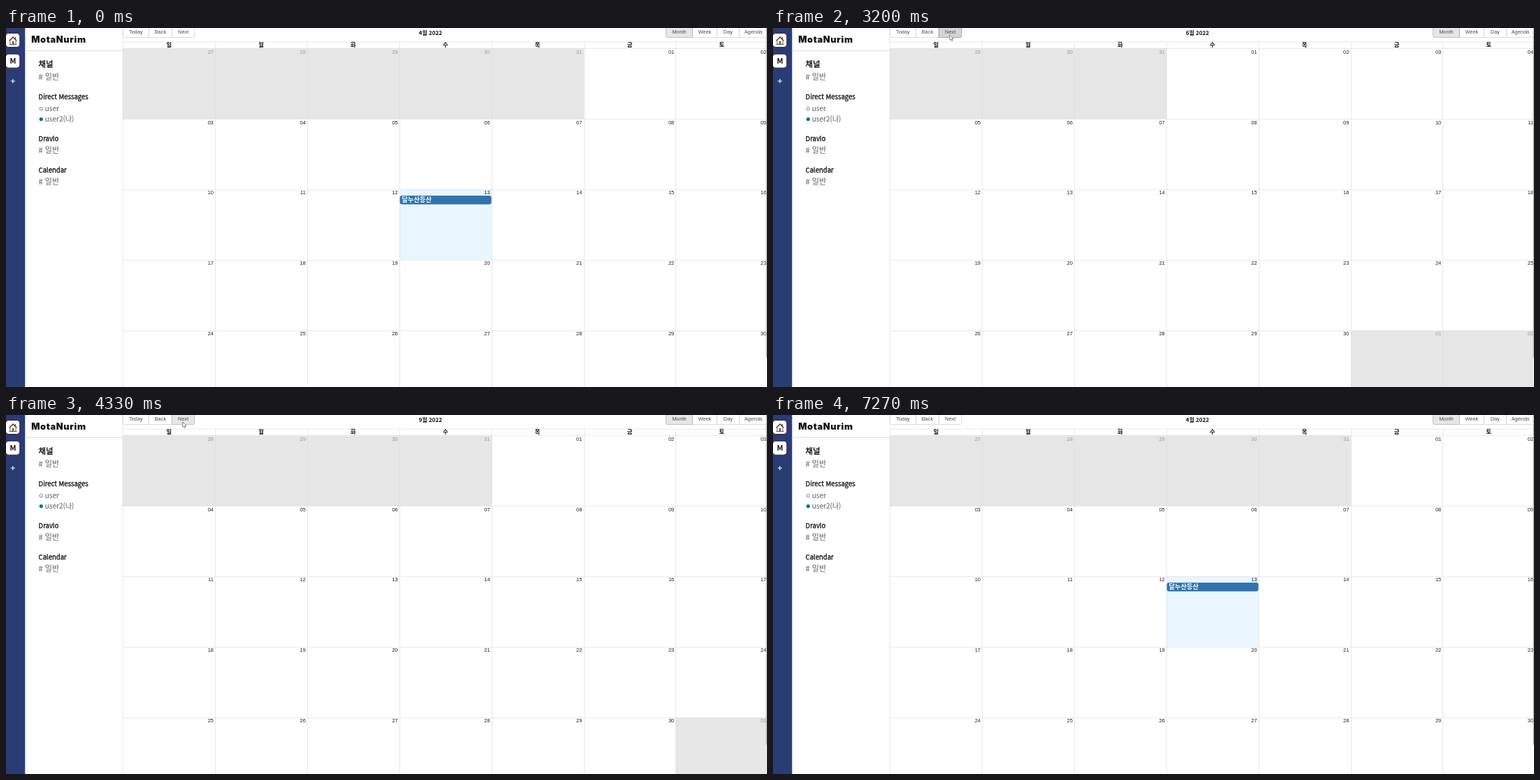
An HTML page for the animation above (8610 ms loop, 1089 by 514 pixels).

```html
<!DOCTYPE html>
<html lang="ko">
<head>
<meta charset="utf-8">
<title>Calendar</title>
<style>
  html, body { margin: 0; width: 100%; height: 100%; overflow: hidden; background: #fff; }
  svg { display: block; width: 100vw; height: 100vh; }
  text { font-family: "Noto Sans CJK KR", "Noto Sans CJK", "Noto Sans CJK JP", sans-serif; white-space: pre; }
  .brand { font: 900 12.8px Inter, sans-serif; letter-spacing: .65px; fill: #111; }
  .head { font-size: 9.5px; fill: #111; stroke: #111; stroke-width: .3px; }
  .head.ko { font-size: 11.4px; stroke-width: .45px; }
  .item { font-size: 10px; fill: #6c6c6c; stroke: #6c6c6c; stroke-width: .12px; }
  .item.ko { font-size: 11px; }
  .week { font-size: 8.3px; font-weight: 700; fill: #111; text-anchor: middle; }
  .label { font-size: 8px; font-weight: 700; fill: #111; text-anchor: middle; }
  .event { font-size: 9.2px; font-weight: 700; fill: #fff; }
  .day { font: 7.5px "Liberation Sans", Arial, sans-serif; fill: #222; text-anchor: end; }
  .day.off { fill: #999; }
  .line { fill: #ddd; opacity: .65; }
  .btn text { font: 7.4px "Liberation Sans", Arial, sans-serif; fill: #4c4f51; text-anchor: middle; }
  .btn path { fill: #fff; stroke: #ccc; stroke-width: .7px; }
  .btn.lit path { fill: #e6e6e6; stroke: #adadad; }
  .btn.down path { fill: #d4d4d4; stroke: #8c8c8c; }
</style>
</head>
<body>
<svg id="stage" viewBox="0 0 1089 514"></svg>
<script>
const LOOP = 8610;
const stage = document.getElementById('stage');

function add(parent, tag, attrs, text) {
  const node = document.createElementNS('http://www.w3.org/2000/svg', tag);
  for (const key in attrs) node.setAttribute(key, attrs[key]);
  if (text) node.textContent = text;
  parent.append(node);
  return node;
}
const box = (parent, x, y, width, height, fill, more) =>
  add(parent, 'rect', { x, y, width, height, fill, ...more });
const line = (parent, x, y, width, height) =>
  add(parent, 'rect', { class: 'line', x, y, width, height });
const label = (parent, cls, x, y, text) => add(parent, 'text', { class: cls, x, y }, text);
const path = (parent, d, fill, more) => add(parent, 'path', { d, fill, ...more });

// Sidebar
function drawSidebar() {
  box(stage, 0, 0, 27.3, 514, '#293c74');
  for (const y of [7.5, 37.2])
    box(stage, -.6, y, 20.4, 20, '#fff', { rx: 4.5, stroke: '#3f1c40', 'stroke-width': 1 });
  path(stage, 'M6 17.5V23.5H14V17.5L10 13.5Z', '#fff', { stroke: '#4a3a34', 'stroke-width': .8 });
  path(stage, 'M4.5 18.3L10 12.8L15.5 18.3', 'none', { stroke: '#4a2a26', 'stroke-width': 1.2 });
  box(stage, 12.7, 12.8, 1.2, 3, '#4a2a26');
  box(stage, 8.8, 18.8, 2.5, 4.5, '#b5372b');
  box(stage, 4.5, 22.9, 11, 1.2, '#2f8045');
  add(stage, 'text', { x: 10, y: 50.7, 'text-anchor': 'middle', 'font-size': 10.5, 'font-weight': 700, fill: '#111' }, 'M');
  path(stage, 'M6.8 76H12.9M9.85 72.9V79.1', 'none', { stroke: '#fff', 'stroke-width': 1.1 });

  label(stage, 'brand', 36.2, 21.3, 'MotaNurim');
  box(stage, 27.5, 32, 139.5, 1, '#ddd');
  label(stage, 'head ko', 46.6, 56.4, '채널');
  label(stage, 'head', 46.6, 101.6, 'Direct Messages');
  label(stage, 'head', 46.6, 161.6, 'Dravlo');
  label(stage, 'head', 46.6, 206.6, 'Calendar');
  for (const y of [73.9, 178.9, 223.9]) label(stage, 'item ko', 46.6, y, '# 일반');
  add(stage, 'circle', { cx: 50.2, cy: 115.6, r: 2.2, fill: 'none', stroke: '#777', 'stroke-width': .9 });
  add(stage, 'circle', { cx: 50.3, cy: 130.6, r: 2.6, fill: '#007a5a' });
  label(stage, 'item', 55.8, 119, 'user');
  label(stage, 'item', 55.8, 134, 'user2(나)');
}

// Calendar
const TOP = 29.4, BOTTOM = 534;
const colX = i => 167.3 + 131.85 * i;
const pad = n => String(n).padStart(2, '0');

function drawMonth(month) {
  const group = add(stage, 'g', { visibility: 'hidden' });
  const first = new Date(2022, month - 1, 1).getDay();
  const days = new Date(2022, month, 0).getDate();
  const rows = Math.ceil((first + days) / 7);
  const rowY = i => TOP + (BOTTOM - TOP) / rows * i;
  const cells = Array.from({ length: rows * 7 }, (_, i) => ({
    x: Math.round(colX(i % 7)), y: Math.round(rowY(i / 7 | 0)),
    right: Math.round(colX(i % 7 + 1)), bottom: Math.round(rowY((i / 7 | 0) + 1)),
    date: new Date(2022, month - 1, 1 - first + i).getDate(),
    off: i < first || i >= first + days,
    now: month === 4 && i === first + 12
  }));
  for (const c of cells)
    if (c.off || c.now)
      box(group, c.x, c.y, c.right - c.x, c.bottom - c.y, c.now ? '#eaf6ff' : '#e6e6e6');
  for (let i = 0; i < rows; i++) line(group, 167, Math.round(rowY(i)), 922, 1);
  for (let i = 1; i < 7; i++) line(group, Math.round(colX(i)), 20, 1, 494);
  cells.forEach((c, i) => {
    label(group, c.off ? 'day off' : 'day', colX(i % 7 + 1) - 2.1, rowY(i / 7 | 0) + 7.2, pad(c.date));
    if (!c.now) return;
    box(group, c.x + .6, c.y + 9, 131, 12.6, '#3174ad', { rx: 3 });
    label(group, 'event', c.x + 3.6, c.y + 18.4, '달누산등산');
  });
  label(group, 'label', 607.3, 9.5, `${month}월 2022`);
  return group;
}

function drawButton(name, x, right, round = '') {
  const group = add(stage, 'g', { class: 'btn' });
  const l = x + .4, r = right + .4;
  const bl = round === 'l' ? 2.5 : 0, br = round === 'r' ? 2.5 : 0;
  path(group, `M${l} -6H${r}V${13.5 - br}q0 ${br} ${-br} ${br}H${l + bl}q${-bl} 0 ${-bl} ${-bl}Z`);
  add(group, 'text', { x: (l + r) / 2, y: 8.4 }, name);
  return { name, x, right, group, state: '' };
}

function setState(button, state) {
  if (button.state === state) return;
  button.state = state;
  button.group.setAttribute('class', 'btn ' + state);
  if (state) button.group.parentNode.append(button.group, cursor);
}

drawSidebar();
const months = {};
for (let m = 4; m <= 10; m++) months[m] = drawMonth(m);
line(stage, 167, 19.5, 922, 1);
line(stage, 166.6, 0, 1, 514);
[...'일월화수목금토'].forEach((d, i) => label(stage, 'week', colX(i + .5), 27, d));

drawButton('Week', 982, 1017);
drawButton('Day', 1017, 1049);
drawButton('Agenda', 1049, 1089, 'r');
const monthButton = drawButton('Month', 944, 982, 'l');
const nav = [
  drawButton('Today', 167, 204, 'l'),
  drawButton('Back', 204, 237),
  drawButton('Next', 237, 269.5, 'r')
];
box(stage, 1087.6, 0, 1.4, 472, '#b4b4b4');
const cursor = path(stage, 'M0 0V7.4L1.8 5.9L3 8.4L4.2 7.9L3.1 5.4H5.3Z', '#fff',
  { stroke: '#555', 'stroke-width': .7, 'stroke-linejoin': 'round' });
setState(monthButton, 'lit');

// Each row holds from its time until the next one.
const monthSteps = [[0, 4], [2000, 5], [2800, 6], [3400, 7], [3870, 8], [4330, 9], [4870, 10], [5470, 4]];
const presses = [[1800, 2000], [2670, 2800], [3200, 3400], [3670, 3870], [4130, 4330], [4670, 4870], [5330, 5470]];
const focusSteps = [[0, ''], [1800, 'Next'], [5330, 'Today'], [7270, '']];
const cursorSteps = [
  [0],
  [470, 118, 50], [537, 146, 56], [603, 186, 58], [670, 228, 55], [737, 266, 46],
  [803, 289, 33], [870, 287, 21], [937, 274, 13], [1003, 262, 9], [1070, 256, 7],
  [1330, 254, 9], [1400, 253, 10.5], [1600, 252.6, 9.6], [1730, 252.8, 10],
  [4930, 246, 10.5], [5000, 229, 12], [5070, 207, 12.5], [5130, 192, 12], [5200, 185, 11],
  [5800, 165, 15], [5870, 119, 22], [5930]
];
const at = (steps, t) => steps.findLast(step => step[0] <= t);

function render(t) {
  const month = at(monthSteps, t)[1];
  for (const m in months) months[m].setAttribute('visibility', +m === month ? 'visible' : 'hidden');

  const [, x, y] = at(cursorSteps, t);
  const shown = x !== undefined;
  cursor.setAttribute('visibility', shown ? 'visible' : 'hidden');
  if (shown) cursor.setAttribute('transform', `translate(${x} ${y})`);

  const focus = at(focusSteps, t)[1];
  const pressed = presses.some(([from, to]) => t >= from && t < to);
  for (const button of nav) {
    const hover = shown && y < 14 && x >= button.x && x < button.right;
    setState(button, hover && pressed ? 'down' : hover || focus === button.name ? 'lit' : '');
  }
}

const start = performance.now();
function tick() {
  render((performance.now() - start) % LOOP);
  requestAnimationFrame(tick);
}
tick();
</script>
</body>
</html>
```
